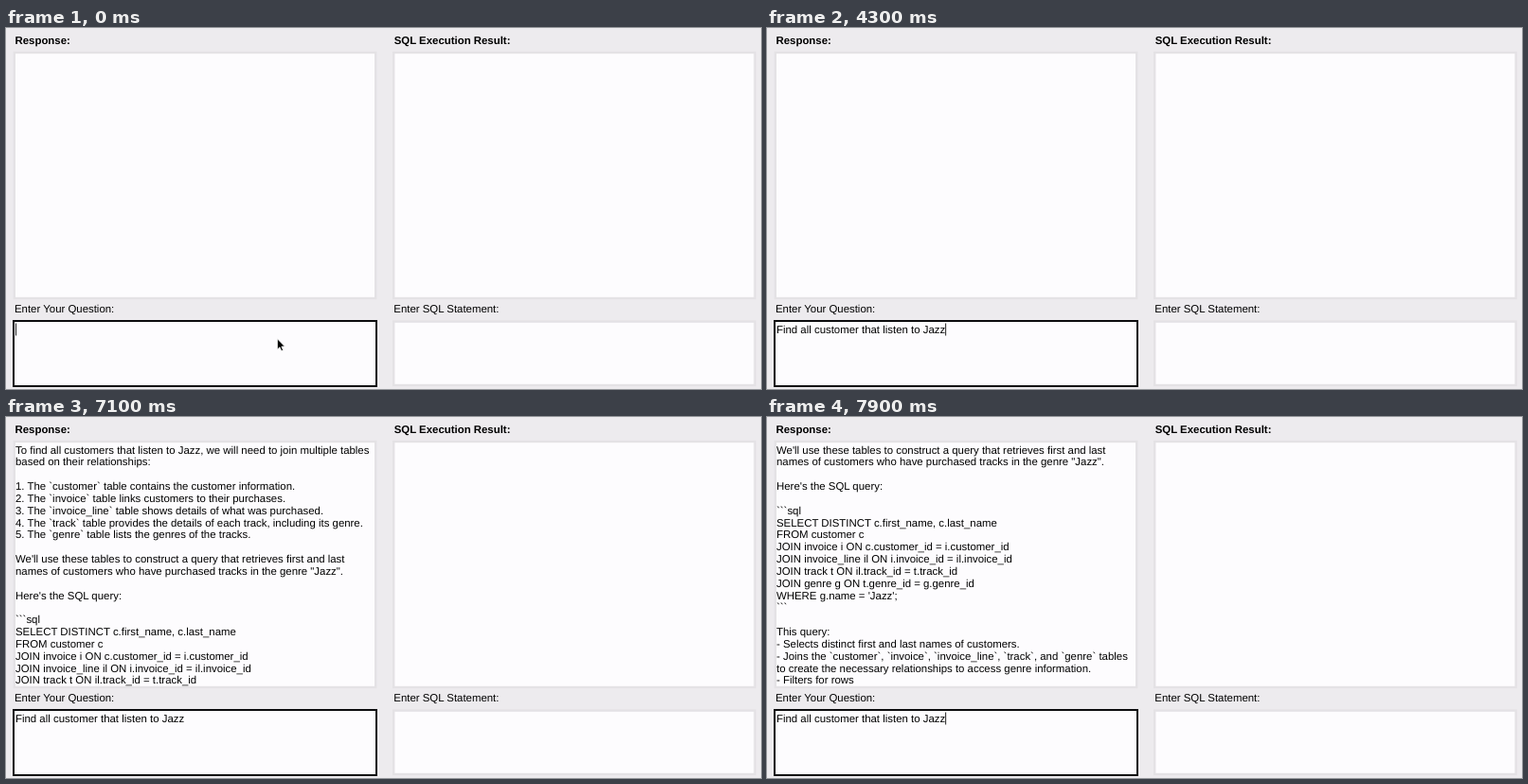
An HTML page for the animation above (8000 ms loop, 797 by 382 pixels).

```html
<!DOCTYPE html>
<html lang="en">
<head>
<meta charset="utf-8">
<title>SQL assistant</title>
<style>
  html, body { margin: 0; width: 100%; height: 100%; overflow: hidden; background: #edebee; }
  svg { display: block; }
  text {
    font: 11.42px "Liberation Sans", Arial, sans-serif;
    text-rendering: geometricPrecision;
    white-space: pre;
  }
  .bold { font-weight: bold; }
  .box { fill: #fdfcfe; stroke: #e4e2e5; stroke-width: 2.4; }
  .focus { stroke: #0c0c0e; stroke-width: 2; }
</style>
</head>
<body>
<svg width="797" height="382" viewBox="0 0 797 382">
  <text class="bold" x="9.5" y="16.8">Response:</text>
  <text class="bold" x="409.7" y="16.8">SQL Execution Result:</text>
  <text x="9" y="301.2">Enter Your Question:</text>
  <text x="409.3" y="301.2">Enter SQL Statement:</text>
  <rect class="box" x="8.8" y="26" width="381.4" height="260"/>
  <rect class="box" x="409.2" y="26" width="381.4" height="260"/>
  <rect class="box focus" x="8" y="310" width="383" height="69"/>
  <rect class="box" x="409.2" y="310.6" width="381.4" height="67.4"/>
  <g id="answer"></g>
  <text id="question" x="10" y="323"></text>
  <rect id="caret" y="312.5" width="1" height="13" fill="#222"/>
  <path id="mouse" d="M0 0V11.4L2.6 9L4.3 13L6.2 12.2L4.5 8.3H8Z" stroke="#fff" stroke-width=".8"/>
</svg>
<script>
const LOOP = 8000, STEP = 100, ROWS = 20, LEFT = 10;
const ask = "Find all customer that listen to Jazz";
const reply = `To find all customers that listen to Jazz, we will need to join multiple tables
based on their relationships:

1. The \`customer\` table contains the customer information.
2. The \`invoice\` table links customers to their purchases.
3. The \`invoice_line\` table shows details of what was purchased.
4. The \`track\` table provides the details of each track, including its genre.
5. The \`genre\` table lists the genres of the tracks.

We'll use these tables to construct a query that retrieves first and last
names of customers who have purchased tracks in the genre "Jazz".

Here's the SQL query:

\`\`\`sql
SELECT DISTINCT c.first_name, c.last_name
FROM customer c
JOIN invoice i ON c.customer_id = i.customer_id
JOIN invoice_line il ON i.invoice_id = il.invoice_id
JOIN track t ON il.track_id = t.track_id
JOIN genre g ON t.genre_id = g.genre_id
WHERE g.name = 'Jazz';
\`\`\`

This query:
- Selects distinct first and last names of customers.
- Joins the \`customer\`, \`invoice\`, \`invoice_line\`, \`track\`, and \`genre\` tables
to create the necessary relationships to access genre information.
- Filters for rows`;

const after = part => reply.indexOf(part) + part.length;

// [time, characters shown]
const typing = [[400, 0], [1100, 9], [1200, 9], [1500, 14], [1800, 14], [2100, 17],
  [2200, 17], [3000, 29], [3200, 29], [3500, 33], [3600, 33], [4000, 37]];
const stream = [[5100, 0], [5700, after("3. The `invoice")], [7100, after("= t.track_id")],
  [7500, after("of customers.\n")], [7900, reply.length]];
const caretOff = [[300, 500], [1500, 1700], [2100, 2300], [3000, 3300], [3700, 3900],
  [4500, 4700], [5400, 5600], [6200, 6500], [7100, 7300]];

const $ = id => document.getElementById(id);
const answer = $("answer"), question = $("question"), caret = $("caret"), mouse = $("mouse");

const rows = Array.from({ length: ROWS }, (_, i) => {
  const row = document.createElementNS("http://www.w3.org/2000/svg", "text");
  row.setAttribute("x", LEFT);
  row.setAttribute("y", 38.6 + i * 12.83);
  return answer.appendChild(row);
});

function count(keys, t) {
  if (t <= keys[0][0]) return 0;
  const i = keys.findIndex(k => k[0] >= t);
  if (i < 0) return keys[keys.length - 1][1];
  const [t0, n0] = keys[i - 1], [t1, n1] = keys[i];
  return Math.round(n0 + (n1 - n0) * (t - t0) / (t1 - t0));
}

// The reply arrives in whole words.
function replyAt(t) {
  let n = count(stream, t);
  while (n && /[a-z]/i.test(reply[n - 1]) && /[a-z]/i.test(reply[n] || "")) n++;
  return reply.slice(0, n);
}

function draw(now) {
  const t = Math.floor(now % LOOP / STEP) * STEP;

  question.textContent = ask.slice(0, count(typing, t));
  caret.setAttribute("x", LEFT + question.getComputedTextLength());
  caret.style.opacity = caretOff.some(([from, to]) => t >= from && t < to) ? 0 : 1;

  const lines = replyAt(t).split("\n").slice(-ROWS);
  rows.forEach((row, i) => row.textContent = lines[i] || "");

  const out = Math.min(1, Math.max(0, (t - 3900) / 400));
  mouse.setAttribute("transform", `translate(${286.4 - 8 * out} ${328.8 + 56 * out * out})`);
  requestAnimationFrame(draw);
}

const start = performance.now();
(function begin() { draw(0); })();
function draw0() {}
</script>
</body>
</html>
```
